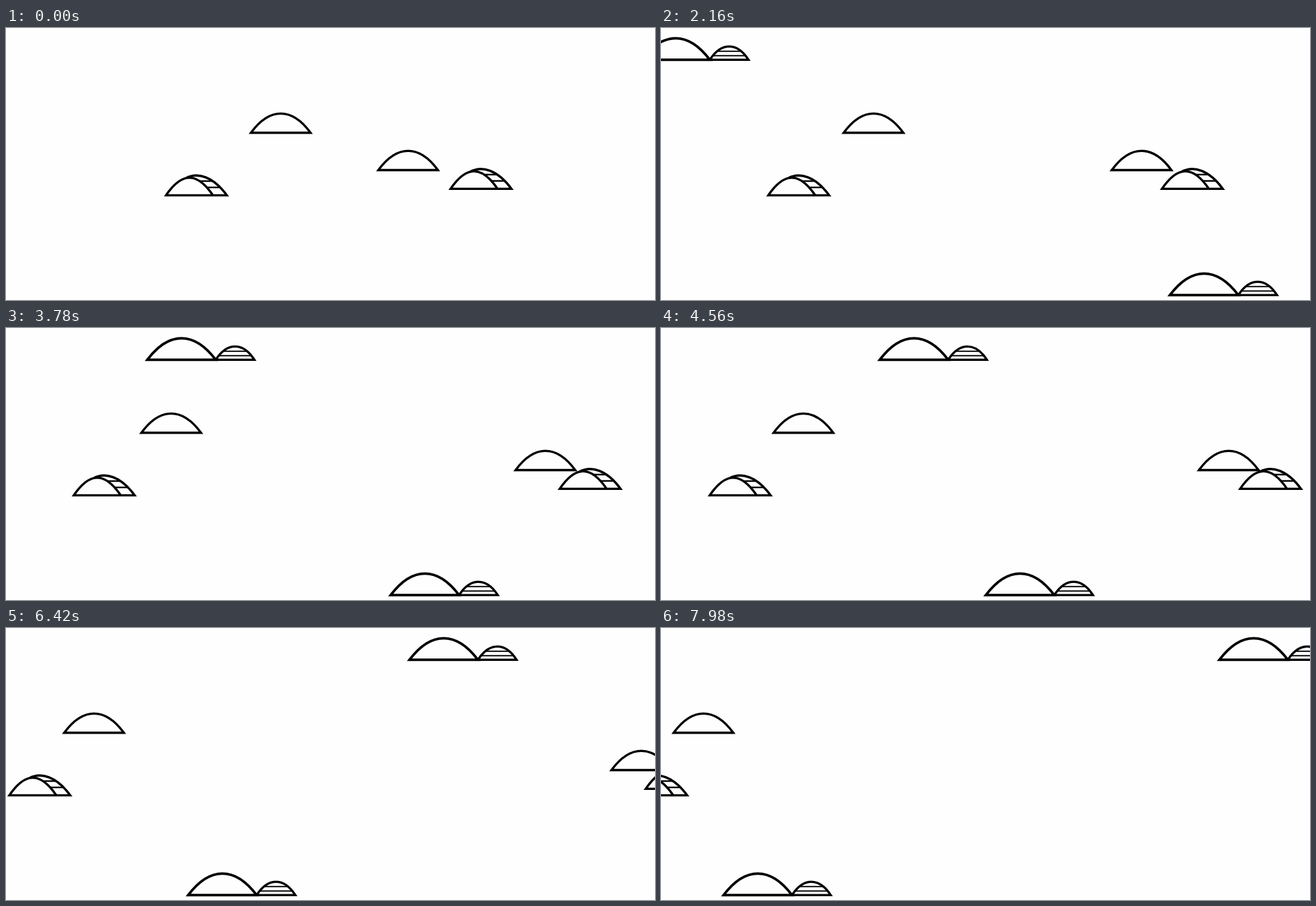
An HTML page that plays this animation: 1024x430 px, repeating every 8000 ms.

```html
<!DOCTYPE html>
<html lang="en">
<head>
<meta charset="utf-8">
<title>Drifting hills</title>
<style>
  html, body { margin: 0; width: 100%; height: 100%; overflow: hidden; background: #fefefe; }
  svg { display: block; width: 1024px; height: 430px; }
  path { fill: none; stroke: #000; stroke-miterlimit: 10; }
</style>
</head>
<body>
<svg viewBox="0 0 1024 430">
  <defs>
    <g id="plain">
      <path stroke-width="3.6" d="M0 0C29.5 -40.5 64.5 -40.5 94 0Z"/>
    </g>
    <g id="ribbed">
      <path stroke-width="2.4" d="M53 -22.5H73M64 -12.5H84"/>
      <path stroke-width="3.6" d="M74 0C49 -37 25 -37 0 0H96C74 -30 50 -37 31 -27"/>
    </g>
    <g id="pair">
      <path stroke-width="1.9" d="M120 -13.5H157M113 -6.5H165"/>
      <path stroke-width="4" d="M0 0C34 -45.5 74 -45.5 108 0Z"/>
      <path stroke-width="3.6" d="M108 0C126 -28 151 -28 169 0Z"/>
    </g>
  </defs>
</svg>
<script>
const LOOP = 8000, STEP = 60;
const svg = document.querySelector('svg');

// x is the place at the start, speed is in pixels per ms
const hills = [
  { shape: 'plain',  x: 386.5,  y: 165.6, speed: -0.0461, delay: 30 },
  { shape: 'ribbed', x: 252.5,  y: 264.5, speed: -0.0385, delay: 0 },
  { shape: 'plain',  x: 587.5,  y: 224.6, speed: 0.0573,  delay: 0 },
  { shape: 'ribbed', x: 701.5,  y: 254.2, speed: 0.0514,  delay: 430 },
  { shape: 'pair',   x: -369.4, y: 50.3,  speed: 0.1567,  delay: 0 },
  { shape: 'pair',   x: 1064.3, y: 422.3, speed: -0.121,  delay: 0 },
];

for (const hill of hills) {
  hill.node = document.createElementNS(svg.namespaceURI, 'use');
  hill.node.setAttribute('href', '#' + hill.shape);
  svg.append(hill.node);
}

function draw(now) {
  const t = Math.floor(now % LOOP / STEP) * STEP;
  for (const { node, x, y, speed, delay } of hills) {
    const left = x + speed * Math.max(0, t - delay);
    node.setAttribute('transform', `translate(${left} ${y})`);
  }
}

const start = performance.now();
function tick() {
  draw(performance.now() - start);
  requestAnimationFrame(tick);
}
tick();
</script>
</body>
</html>
```
